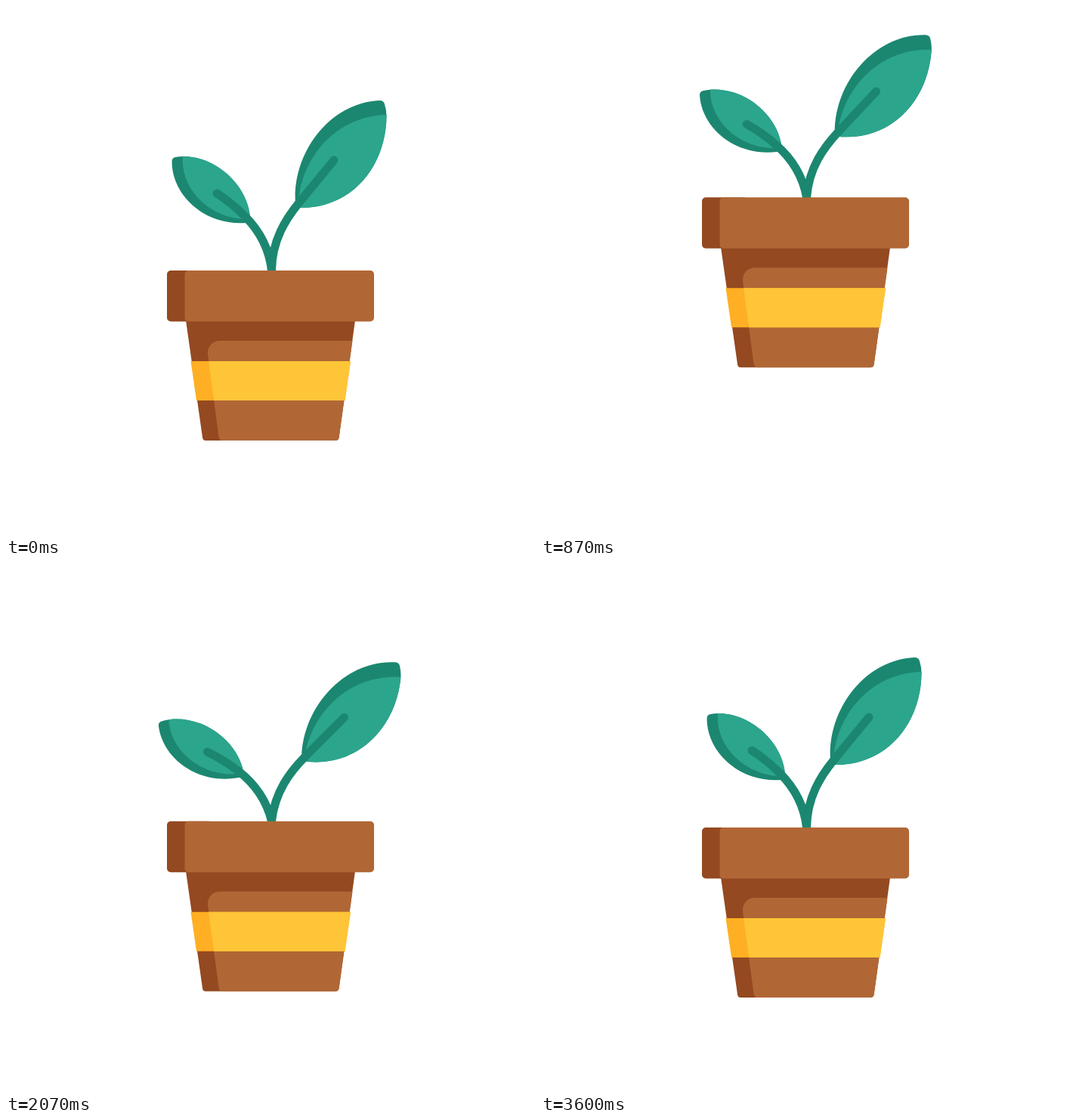
Recreate the animation shown at these times as an HTML page. Size 700 by 700 pixels, loop 4630 ms.

```html
<!DOCTYPE html>
<html lang="en">
<head>
<meta charset="utf-8">
<title>Hopping plant</title>
<style>
  html, body { margin: 0; width: 100%; height: 100%; overflow: hidden; background: #fff; }
  svg { display: block; width: 100%; height: 100%; }
  .stem { fill: none; stroke: #1c8770; stroke-width: 11; stroke-linecap: round; stroke-linejoin: round; }
  .leaf { fill: #1c8770; }
  .leaf-light { fill: #2ca58d; }
  .clay { fill: #b06735; }
  .clay-dark { fill: #944921; }
  .band { fill: #ffc538; }
  .band-dark { fill: #ffaf23; }
</style>
</head>
<body>
<svg viewBox="0 0 700 700">
  <g id="plant">
    <g id="left">
      <path class="leaf" d="M219.500 206 Q219.500 201 224 200 Q229 199 236 199 C281 200 321 240 323 281 Q323 286 318 287 C262 291 219.500 250 219.500 206Z"/>
      <path class="leaf-light" d="M234 199 H236 C281 200 321 240 323 281 L322 282 C272 284 230 243 234 199Z"/>
      <path class="stem" d="M352 357 L351.5 350 C348 318 334 296 316 278 C306 268 293 257 279 248"/>
    </g>
    <g id="right">
      <path class="leaf" d="M383 262 C378 195 428 128 494 125 Q500 125 501 130 Q503.500 138 503.500 145 C503.500 208 462 266 392 267 Q384 267 383 262Z"/>
      <path class="leaf-light" d="M503.500 144 C503.500 208 462 266 392 267 L387 266 C386 213 428 146 503.500 144Z"/>
      <path class="stem" d="M351.5 357 V350 C352 310 370 282 388 260 L434 204"/>
    </g>
    <path class="clay-dark" d="M238 416 H462 L440.6 571 Q440 575 436 575 H264 Q260.500 575 260 571Z"/>
    <path class="clay" d="M458.500 443 H283 C273 443 266 451 267 461 L281.500 570 Q282.500 575 286 575 H436 Q440 575 440.600 571Z"/>
    <path class="band-dark" d="M244.500 470 H456 L448.500 522 H252Z"/>
    <path class="band" d="M268 470 H456 L448.500 522 H275.300Z"/>
    <rect class="clay-dark" x="213" y="350" width="60" height="67.500" rx="5"/>
    <rect class="clay" x="236.500" y="350" width="250.500" height="67.500" rx="5"/>
  </g>
</svg>
<script>
  const LOOP = 4630, END = 3600, STEP = 30;
  const [plant, left, right] = ["plant", "left", "right"].map(id => document.getElementById(id));

  // Cubic timing curve, solved for its parameter by bisection.
  function curve(x1, y1, x2, y2) {
    const at = (a, b, s) => 3 * (1 - s) * (1 - s) * s * a + 3 * (1 - s) * s * s * b + s * s * s;
    return x => {
      if (x <= 0 || x >= 1) return x <= 0 ? 0 : 1;
      let lo = 0, hi = 1;
      for (let i = 0; i < 30; i++) {
        const mid = (lo + hi) / 2;
        if (at(x1, x2, mid) < x) lo = mid; else hi = mid;
      }
      return at(y1, y2, lo);
    };
  }

  const wave = x => (1 - Math.cos(Math.PI * x)) / 2;
  const settle = curve(0.25, 0, 0.45, 1);
  const gather = curve(0.55, 0, 0.75, 1);

  // Each key: time, value, easing that leads to it.
  const hop = [
    [0, 0],
    [1080, 99, curve(0.28, 0.1, 0.25, 1)],
    [2220, 0, curve(0.7, 0, 0.7, 0.98)]
  ];
  const swing = (first, second) => [
    [0, 0],
    [465, first, settle],
    [1470, -6.3, settle],
    [2360, second, gather],
    [3110, -6.3, wave],
    [END, 0, wave]
  ];
  const swingLeft = swing(15.2, 16.4);
  const swingRight = swing(15, 13.1);

  function valueAt(keys, t) {
    const i = keys.findIndex(key => key[0] > t);
    if (i < 0) return keys[keys.length - 1][1];
    const [t0, v0] = keys[i - 1], [t1, v1, ease] = keys[i];
    return v0 + (v1 - v0) * ease((t - t0) / (t1 - t0));
  }

  function turn(part, angle) {
    part.setAttribute("transform", `rotate(${angle.toFixed(3)} 351 350)`);
  }

  function draw(time) {
    const t = Math.min(END, Math.floor((time % LOOP) / STEP) * STEP);
    plant.setAttribute("transform", `translate(0 ${(-valueAt(hop, t)).toFixed(2)})`);
    turn(left, -valueAt(swingLeft, t));
    turn(right, valueAt(swingRight, t));
  }

  const start = performance.now();
  function tick() {
    draw(performance.now() - start);
    requestAnimationFrame(tick);
  }
  tick();
</script>
</body>
</html>
```
